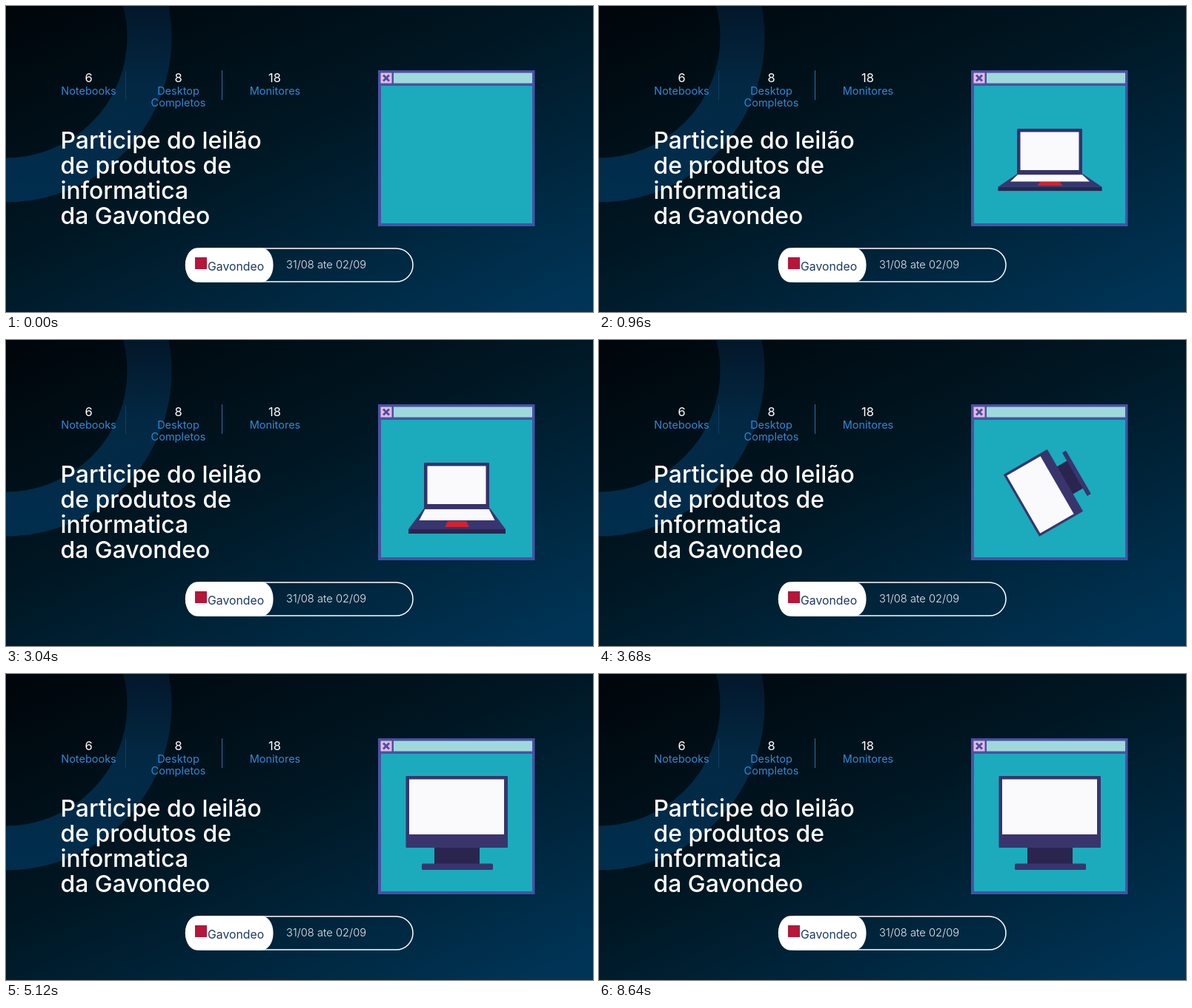
Recreate the animation shown at these times as an HTML page. Size 792 px wide and 414 px high, loop 8.8 s.

```html
<!DOCTYPE html>
<html lang="pt">
<head>
<meta charset="utf-8">
<title>Leilão de informatica</title>
<style>
  html, body { margin: 0; width: 100%; height: 100%; overflow: hidden; background: #000d17; }
  svg { display: block; width: 100vw; height: 100vh; font-family: Inter, "Open Sans", sans-serif; }
  .title { font-size: 31.9px; font-weight: 500; fill: #fff; }
  .count { font-size: 16.5px; fill: #fff; text-anchor: middle; }
  .label { font-size: 14.5px; fill: #2b8bdc; text-anchor: middle; }
  .date { font-size: 14.7px; font-weight: 300; fill: #e6edf3; }
  .brand { font-size: 15.8px; fill: #1c3a62; }
</style>
</head>
<body>
<svg viewBox="0 0 792 414">
  <defs>
    <linearGradient id="night" gradientUnits="userSpaceOnUse" x1="170" y1="-60" x2="440" y2="540">
      <stop offset="0" stop-color="#00060b"/>
      <stop offset=".45" stop-color="#001723"/>
      <stop offset="1" stop-color="#003456"/>
    </linearGradient>
    <linearGradient id="ringBlue" gradientUnits="userSpaceOnUse" x1="0" y1="0" x2="0" y2="266">
      <stop offset="0" stop-color="#03172a"/>
      <stop offset=".4" stop-color="#032843"/>
      <stop offset="1" stop-color="#002e4e"/>
    </linearGradient>
    <clipPath id="pane"><rect x="506" y="108" width="204" height="186"/></clipPath>
  </defs>

  <rect width="792" height="414" fill="url(#night)"/>
  <circle cx="0" cy="42" r="193.5" fill="none" stroke="url(#ringBlue)" stroke-width="60"/>

  <g class="count">
    <text x="111.5" y="103">6</text>
    <text x="232.5" y="103">8</text>
    <text x="362.5" y="103">18</text>
  </g>
  <g class="label">
    <text x="111.5" y="120">Notebooks</text>
    <text x="232.5" y="120">Desktop</text>
    <text x="232.5" y="135.5">Completos</text>
    <text x="363" y="120">Monitores</text>
  </g>
  <path d="M161.5 88V127" stroke="#123f63"/>
  <path d="M291.5 87V127" stroke="#2074b5"/>

  <g class="title">
    <text x="73.5" y="192.5">Participe do leilão</text>
    <text x="73.5" y="226.8">de produtos de</text>
    <text x="73.5" y="261">informatica</text>
    <text x="73.5" y="295.3">da Gavondeo</text>
  </g>

  <rect x="242.5" y="328" width="306.5" height="45" rx="22.5" fill="none" stroke="#fff" stroke-width="1.5"/>
  <rect x="242" y="327.3" width="118.5" height="46.4" rx="16" ry="22" fill="#fff"/>
  <rect x="255" y="340" width="16" height="16" fill="#b5163a"/>
  <text class="brand" x="272" y="358">Gavondeo</text>
  <text class="date" x="378" y="355">31/08 ate 02/09</text>

  <rect x="502" y="87" width="211.5" height="211" fill="#4a51a3"/>
  <rect x="505.5" y="90.5" width="15" height="14" fill="#e5b9e4"/>
  <path d="M509 93.5L517 101.5M517 93.5L509 101.5" stroke="#4a51a3" stroke-width="3"/>
  <rect x="523" y="90.5" width="187" height="14" fill="#9fd9dc"/>
  <rect x="506" y="108" width="204" height="186" fill="#1babbd"/>

  <g clip-path="url(#pane)">
    <g id="laptop">
      <g id="lid">
        <rect x="564" y="166" width="88" height="62" rx="1" fill="#35316a"/>
        <rect x="568.5" y="170.5" width="79" height="51.5" fill="#fafafc"/>
      </g>
      <polygon id="deck" fill="#39356f"/>
      <polygon id="keys" fill="#fafafc"/>
      <polygon id="pad" fill="#d8202c"/>
      <rect id="edge" fill="#29254f"/>
    </g>
    <g id="monitor">
      <rect x="578" y="234" width="61" height="24" fill="#29254f"/>
      <rect x="539.5" y="138" width="137.5" height="97" rx="1" fill="#39356c"/>
      <rect x="544" y="142.5" width="128" height="74.5" fill="#fafafc"/>
      <rect x="561" y="256.5" width="96" height="8.5" rx="1.5" fill="#39356c"/>
    </g>
  </g>
</svg>
<script>
const LOOP = 8800, STEP = 80, HINGE_Y = 227, CENTER_X = 608.5;
const $ = id => document.getElementById(id);
const set = (id, attrs) => Object.entries(attrs).forEach(([k, v]) => $(id).setAttribute(k, v));
const progress = (t, start, length) => Math.min(1, Math.max(0, (t - start) / length));
const easeOut = (u, power) => 1 - (1 - u) ** power;
const about = (x, y, change) => `translate(${x} ${y}) ${change} translate(${-x} ${-y})`;

// The deck tilts from edge-on and wide (tilt 2.6) to its resting slope (tilt 0).
function drawDeck(tilt) {
  const halfWidth = depth => 44 + depth * (21.5 + 4.5 * tilt);
  const depthY = depth => HINGE_Y + depth * (29 - 11 * tilt);
  const slab = (id, back, backSpan, front, frontSpan) => {
    const point = (depth, span) => `${CENTER_X + span * halfWidth(depth)},${depthY(depth)}`;
    set(id, { points: [point(back, -backSpan), point(back, backSpan),
                       point(front, frontSpan), point(front, -frontSpan)].join(" ") });
  };
  slab("deck", 0, 1, 1, 1);
  slab("keys", .07, .95, .59, .9);
  slab("pad", .62, .22, .9, .255);
  set("edge", { x: CENTER_X - halfWidth(1), y: depthY(1), width: 2 * halfWidth(1), height: 6 - .6 * tilt });
}

function render(t) {
  const laptopScale = easeOut(progress(t, 0, 400), 3) * (1 - progress(t, 3200, 320) ** 2);
  set("laptop", { transform: about(CENTER_X, HINGE_Y, `scale(${laptopScale})`) });
  set("lid", { transform: about(CENTER_X, HINGE_Y, `scale(1 ${easeOut(progress(t, 240, 640), 3)})`) });
  drawDeck(2.6 * (1 - easeOut(progress(t, 400, 1500), 2)));

  const angle = -180 * (1 - easeOut(progress(t, 3520, 1266), 3));
  const monitorScale = easeOut(progress(t, 3520, 480), 3);
  set("monitor", { transform: about(CENTER_X, 201.5, `rotate(${angle}) scale(${monitorScale})`) });
}

function frame() {
  render(Math.floor(performance.now() % LOOP / STEP) * STEP);
  requestAnimationFrame(frame);
}
frame();
</script>
</body>
</html>
```
